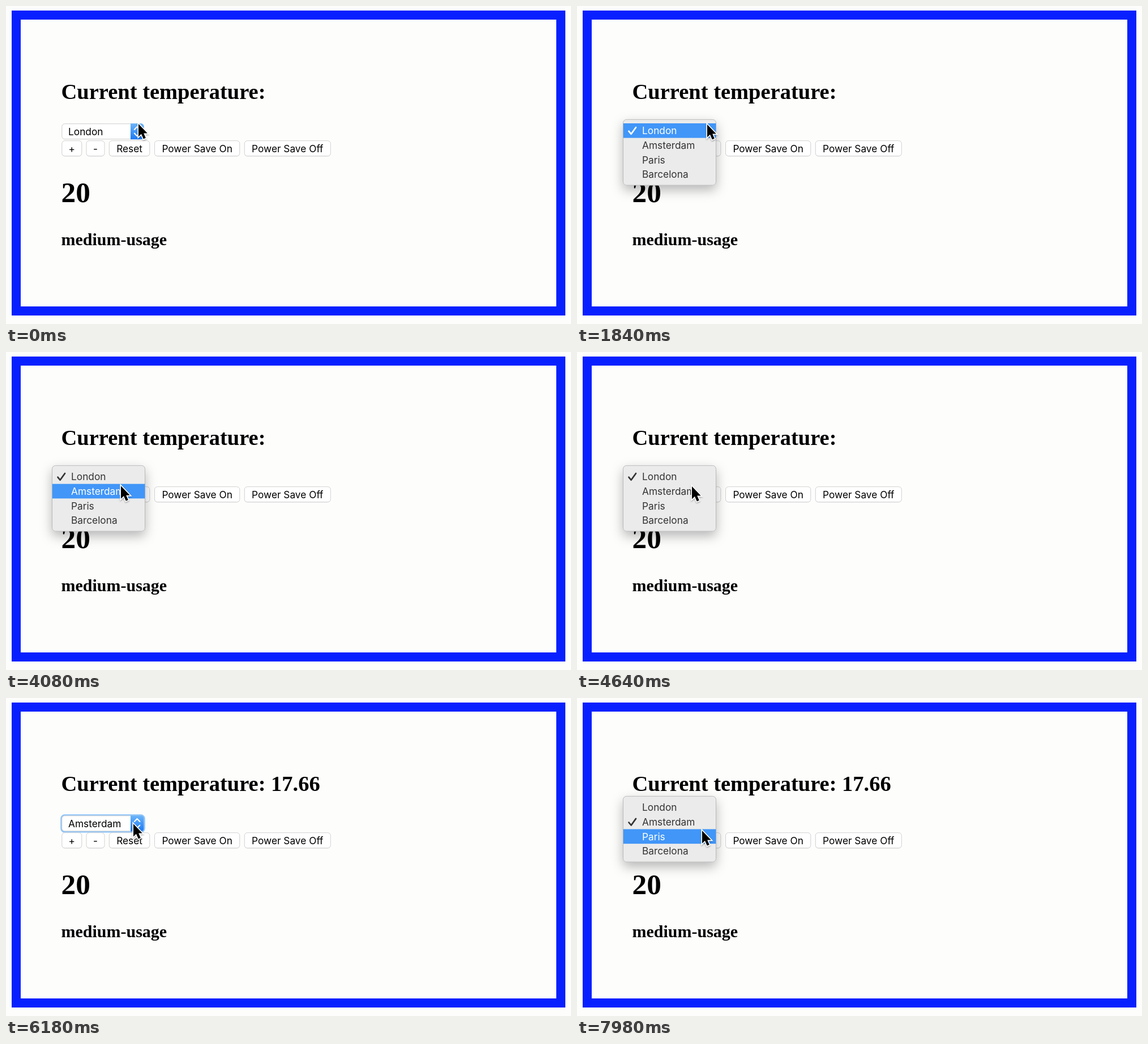
These frames come from a looping animation (998 px wide and 561 px high, 8 s). An HTML page:

```html
<!DOCTYPE html>
<html lang="en">
<head>
<meta charset="utf-8">
<title>Thermostat</title>
<style>
  html, body { margin: 0; width: 100%; height: 100%; overflow: hidden; background: #fdfdfc; }
  svg { display: block; width: 100vw; height: 100vh; }
  .serif { font-family: "Liberation Serif", "Times New Roman", serif; font-weight: bold; }
  .ui { font: 17.3px Inter, Roboto, sans-serif; }
</style>
</head>
<body>
<svg viewBox="0 0 998 561" xmlns="http://www.w3.org/2000/svg">
  <defs>
    <linearGradient id="blue" x1="0" y1="0" x2="0" y2="1">
      <stop offset="0" stop-color="#6cb5fa"/>
      <stop offset="1" stop-color="#1a79f6"/>
    </linearGradient>
    <filter id="menuShadow" x="-30%" y="-40%" width="160%" height="200%">
      <feDropShadow dx="0" dy="8" stdDeviation="10" flood-color="#000" flood-opacity=".28"/>
    </filter>
    <filter id="cursorShadow" x="-40%" y="-30%" width="190%" height="180%">
      <feDropShadow dx="0" dy="1.5" stdDeviation="1.3" flood-color="#000" flood-opacity=".35"/>
    </filter>
  </defs>

  <rect width="998" height="561" fill="#fdfdfc"/>
  <rect x="18" y="16" width="962" height="522" fill="none" stroke="#0820ff" stroke-width="16"/>

  <g class="serif">
    <text id="heading" x="97.5" y="164" font-size="38.5"></text>
    <text x="97.5" y="346" font-size="51.4">20</text>
    <text x="97.5" y="421.5" font-size="30">medium-usage</text>
  </g>

  <g class="ui">
    <rect id="ring" x="97.7" y="206.7" width="146.6" height="29.4" rx="6" fill="none" stroke="#8fc5fa" stroke-width="3"/>
    <rect x="98.8" y="207.8" width="144.4" height="27" rx="5" fill="#fff" stroke="#cdcdcd"/>
    <path d="M220 207.3h18.4a5 5 0 0 1 5 5v18a5 5 0 0 1-5 5H220z" fill="url(#blue)"/>
    <path d="M226.8 218l4.8-5 4.8 5M226.8 224.5l4.8 5 4.8-5" fill="none" stroke="#fff"
      stroke-width="2" stroke-linecap="round" stroke-linejoin="round"/>
    <text id="chosen" x="110" y="227.6"></text>
    <g id="buttons" text-anchor="middle"></g>
  </g>

  <g id="menu" class="ui">
    <rect x="81.5" y="200.3" width="164" height="115.9" rx="6" fill="#ebebeb" stroke="#b9b9b9" filter="url(#menuShadow)"/>
    <rect id="bar" x="81.8" width="163.6" height="25.7" fill="#4196f8"/>
    <g id="items"></g>
    <path id="check" d="M91.5 220.8l4.2 5 8.3-11.6" fill="none" stroke-width="2.7"
      stroke-linecap="round" stroke-linejoin="round"/>
  </g>

  <g id="cursor" filter="url(#cursorShadow)">
    <path d="M0 0V22.5L5 17.8 8.8 26.5 12.8 24.8 9.2 16.6H15.8Z" fill="#000" stroke="#fff"
      stroke-width="3.2" stroke-linejoin="miter" paint-order="stroke"/>
  </g>
</svg>

<script>
const LOOP = 8000;
const ROW = 25.7;
const CITIES = ["London", "Amsterdam", "Paris", "Barcelona"];
const BUTTONS = [["+", 98.8, 35], ["-", 142, 32], ["Reset", 182.3, 71.5],
  ["Power Save On", 262.5, 150.3], ["Power Save Off", 421.3, 152]];

// Pointer stops: time, x, y
const STOPS = [[0, 234, 208], [300, 234, 208], [1300, 230, 209], [1950, 230, 209],
  [2850, 207, 231], [3350, 207, 231], [3900, 203, 236], [4500, 203, 237],
  [5250, 203, 237], [6050, 225, 222], [7250, 225, 222], [7800, 221, 234]];

// Times at which the state switches
const OPEN_1 = 420, HOVER_1 = 3560, CLICK = 4640, FADE = 4830, FADE_END = 5040;
const PICKED = 5120, LOADED = 5960, OPEN_2 = 6900, HOVER_2 = 7620;

const $ = id => document.getElementById(id);

function add(parent, tag, attrs, text = "") {
  const node = document.createElementNS("http://www.w3.org/2000/svg", tag);
  for (const key in attrs) node.setAttribute(key, attrs[key]);
  node.textContent = text;
  parent.appendChild(node);
  return node;
}

for (const [label, x, width] of BUTTONS) {
  add($("buttons"), "rect", { x, y: 238.3, width, height: 27, rx: 5, fill: "#c9c9c9" });
  add($("buttons"), "rect", { x, y: 237.7, width, height: 27, rx: 5, fill: "#fff", stroke: "#d2d2d2" });
  add($("buttons"), "text", { x: x + width / 2, y: 258 }, label);
}
const items = CITIES.map((city, i) =>
  add($("items"), "text", { x: 115, y: 226.1 + i * ROW }, city));

function pointer(t) {
  const next = STOPS.findIndex(stop => stop[0] > t);
  if (next < 0) return STOPS[STOPS.length - 1].slice(1);
  const [t0, x0, y0] = STOPS[next - 1], [t1, x1, y1] = STOPS[next];
  const k = (t - t0) / (t1 - t0), e = k * k * (3 - 2 * k);
  return [x0 + (x1 - x0) * e, y0 + (y1 - y0) * e];
}

function menuOpacity(t) {
  if (t < OPEN_1 || (t >= FADE_END && t < OPEN_2)) return 0;
  return t > FADE && t < FADE_END ? (FADE_END - t) / (FADE_END - FADE) : 1;
}

function hovered(t) {
  if (t >= OPEN_2) return t < HOVER_2 ? 1 : 2;
  if (t >= CLICK && t < CLICK + 70) return -1;
  return t < HOVER_1 ? 0 : 1;
}

function render(t) {
  const picked = t < PICKED ? 0 : 1;
  const hover = hovered(t);
  const ink = i => i === hover ? "#fff" : "#333";

  $("heading").textContent = "Current temperature:" + (t < LOADED ? "" : " 17.66");
  $("chosen").textContent = CITIES[picked];
  $("ring").setAttribute("visibility", t < OPEN_1 ? "hidden" : "visible");

  $("menu").setAttribute("opacity", menuOpacity(t));
  $("menu").setAttribute("transform", `translate(0 ${t < OPEN_2 ? 0 : -27})`);
  $("bar").setAttribute("y", 207 + hover * ROW);
  $("bar").setAttribute("visibility", hover < 0 ? "hidden" : "visible");
  items.forEach((item, i) => item.setAttribute("fill", ink(i)));
  $("check").setAttribute("stroke", ink(picked));
  $("check").setAttribute("transform", `translate(0 ${picked * ROW})`);

  $("cursor").setAttribute("transform", `translate(${pointer(t).join(" ")})`);
}

const start = performance.now();
function tick() {
  render((performance.now() - start) % LOOP);
  requestAnimationFrame(tick);
}
tick();
</script>
</body>
</html>
```
